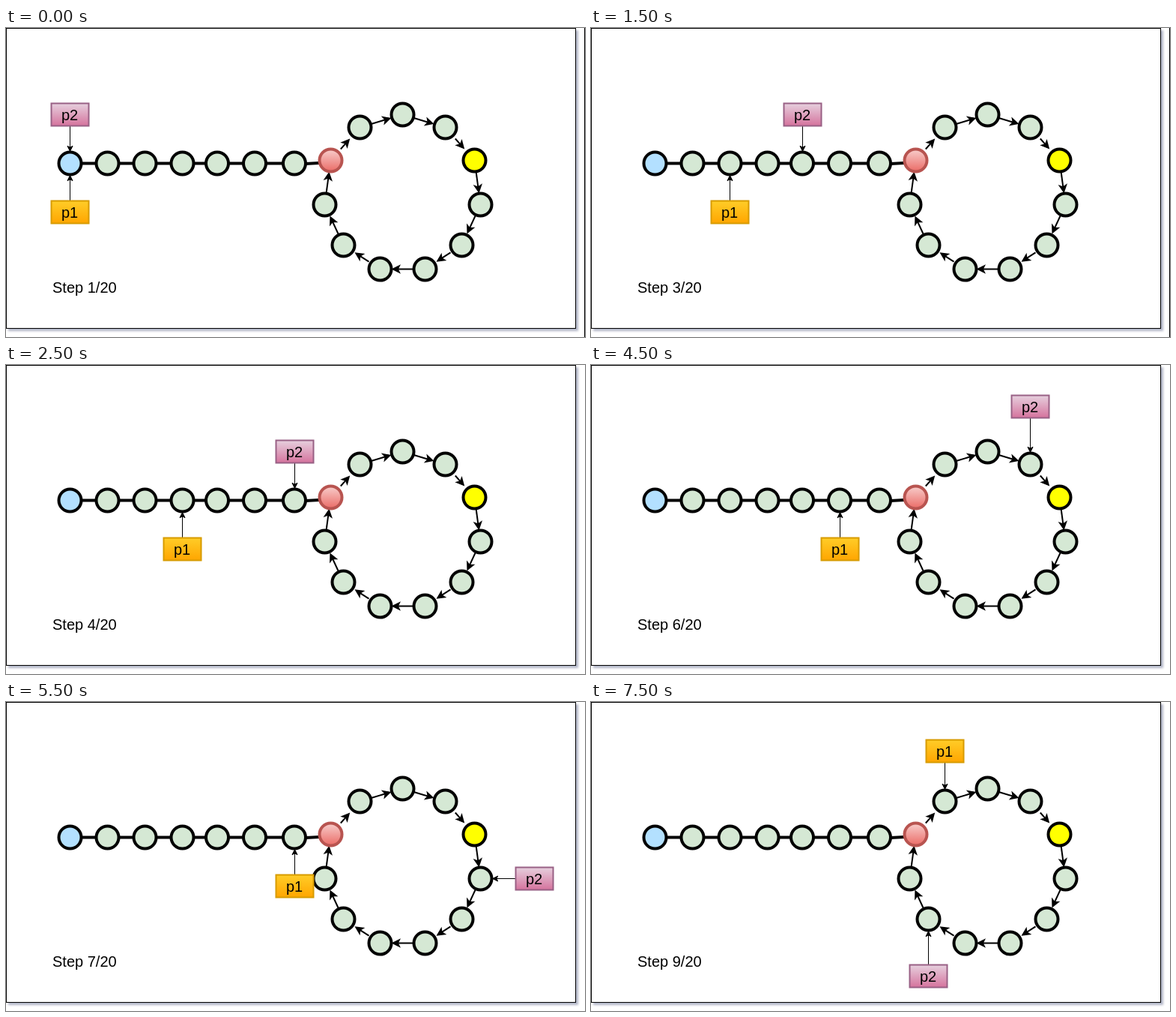
Recreate the animation shown at these times as an HTML page. Size 773 px wide and 412 px high, loop 8000 ms.

```html
<!DOCTYPE html>
<html>
<head>
<meta charset="utf-8">
<style>
  html, body { margin: 0; width: 100%; height: 100%; overflow: hidden; background: #fff; }
  svg { display: block; }
  text { font: 20px "Liberation Sans", Arial, sans-serif; }
  .frame { fill: #fff; stroke: #000; filter: drop-shadow(3px 3px 1.7px rgba(61, 69, 116, .4)); }
</style>
</head>
<body>
<svg width="773" height="412" viewBox="0 0 773 412">
  <defs>
    <linearGradient id="red" x2="0" y2="1"><stop stop-color="#f8cecc"/><stop offset="1" stop-color="#ea6b66"/></linearGradient>
    <linearGradient id="p1" x2="0" y2="1"><stop stop-color="#ffcd28"/><stop offset="1" stop-color="#ffa500"/></linearGradient>
    <linearGradient id="p2" x2="0" y2="1"><stop stop-color="#e6d0de"/><stop offset="1" stop-color="#d5739d"/></linearGradient>
  </defs>
  <rect class="frame" x=".5" y=".5" width="760" height="400"/>
  <path id="edge" d="M772.5 0V412" stroke="#000"/>
  <g id="graph"></g>
  <g id="pointers"></g>
  <text id="label" x="62" y="353"></text>
</svg>
<script>
const $ = id => document.getElementById(id);
const R = 15, LOOP = 11, ENTRY = 7, MEETING = 11;

// a straight row of nodes leads into a regular loop, numbered clockwise from ENTRY
const row = [85.5, 135.5, 185.5, 235.5, 282, 332, 385].map(x => [x, 180.5]);
const loop = Array.from({ length: LOOP }, (_, i) => {
  const angle = (i - 2) * 2 * Math.PI / LOOP;
  return [529.5 + Math.round(105 * Math.sin(angle)), 220.5 - Math.round(105 * Math.cos(angle))];
});
const nodes = [...row, ...loop];
const fills = { 0: '#b3e0ff', [ENTRY]: 'url(#red)', [MEETING]: '#ffff00' };

// polyline through points, ending in a notched arrowhead
function arrow(points, width) {
  const [[ax, ay], [bx, by]] = points.slice(-2);
  const len = Math.hypot(bx - ax, by - ay), ux = (bx - ax) / len, uy = (by - ay) / len;
  const size = 6 + width, back = 1.118 * width;
  const at = (along, side) => [bx - ux * (back + along) - uy * side, by - uy * (back + along) + ux * side];
  const notch = at(size * .75, 0);
  const line = [...points.slice(0, -1), notch];
  const head = [at(0, 0), at(size, size / 2), notch, at(size, -size / 2)];
  return `<g stroke="#000" stroke-width="${width}" stroke-miterlimit="10">
    <polyline points="${line}" fill="none"/><polygon points="${head}"/></g>`;
}

// arrow between two nodes, clipped to the square around each
function link([ax, ay], [bx, by]) {
  const dx = bx - ax, dy = by - ay, k = R / Math.max(Math.abs(dx), Math.abs(dy));
  return arrow([[ax + dx * k, ay + dy * k], [bx - dx * k, by - dy * k]], 2);
}

function pointer(name, x, y, path) {
  const stroke = name === 'p1' ? '#d79b00' : '#996185';
  return arrow(path, 1) +
    `<rect x="${x}" y="${y}" width="50" height="30" fill="url(#${name})" stroke="${stroke}" stroke-width="2"/>
     <text x="${x + 24.5}" y="${y + 22.5}" text-anchor="middle">${name}</text>`;
}

// box centred over or under a node, with a straight arrow to it
function vertical(name, node, top) {
  const x = Math.floor(nodes[node][0]) + .5, y = nodes[node][1], above = top < y;
  return pointer(name, x - 25, top, [[x, above ? top + 30 : top], [x, above ? y - R : y + R]]);
}

function pointerOne(step) {
  if (step === 8) return pointer('p1', 336.5, 235.5, [[386.5, 250.5], [405.5, 250.5], [405.5, 187], [423.5, 187]]);
  return vertical('p1', step - 1, step < 8 ? 230.5 : 50.5);
}

function pointerTwo(step) {
  const node = 2 * (step - 1), [x, y] = nodes[node];
  if (step === 7) return pointer('p2', x + 47, y - 15, [[x + 47, y], [x + R, y]]);
  if (step === 8) return pointer('p2', x + 31, y + 29, [[x + 31, y + 44], [x, y + 44], [x, y + R]]);
  return vertical('p2', node, step < 5 ? 100.5 : step < 7 ? 40.5 : 350.5);
}

$('graph').innerHTML =
  '<path d="M85.5 180.5H385L400 181L418 180" fill="none" stroke="#000" stroke-width="4"/>' +
  loop.map((node, i) => link(node, loop[(i + 1) % LOOP])).join('') +
  nodes.map(([x, y], i) => `<circle cx="${x}" cy="${y}" r="${R}" fill="${fills[i] || '#d5e8d4'}"
    stroke="${i === ENTRY ? '#b85450' : '#000'}" stroke-width="4"/>`).join('');

let shown = 0;
function draw(now) {
  const step = 1 + Math.floor((now % 8000 + 500) / 1000);
  if (step !== shown) {
    shown = step;
    $('pointers').innerHTML = pointerOne(step) + pointerTwo(step);
    $('label').textContent = `Step ${step}/20`;
    $('edge').style.display = step < 4 ? '' : 'none';
  }
  requestAnimationFrame(draw);
}
draw(0);
</script>
</body>
</html>
```
